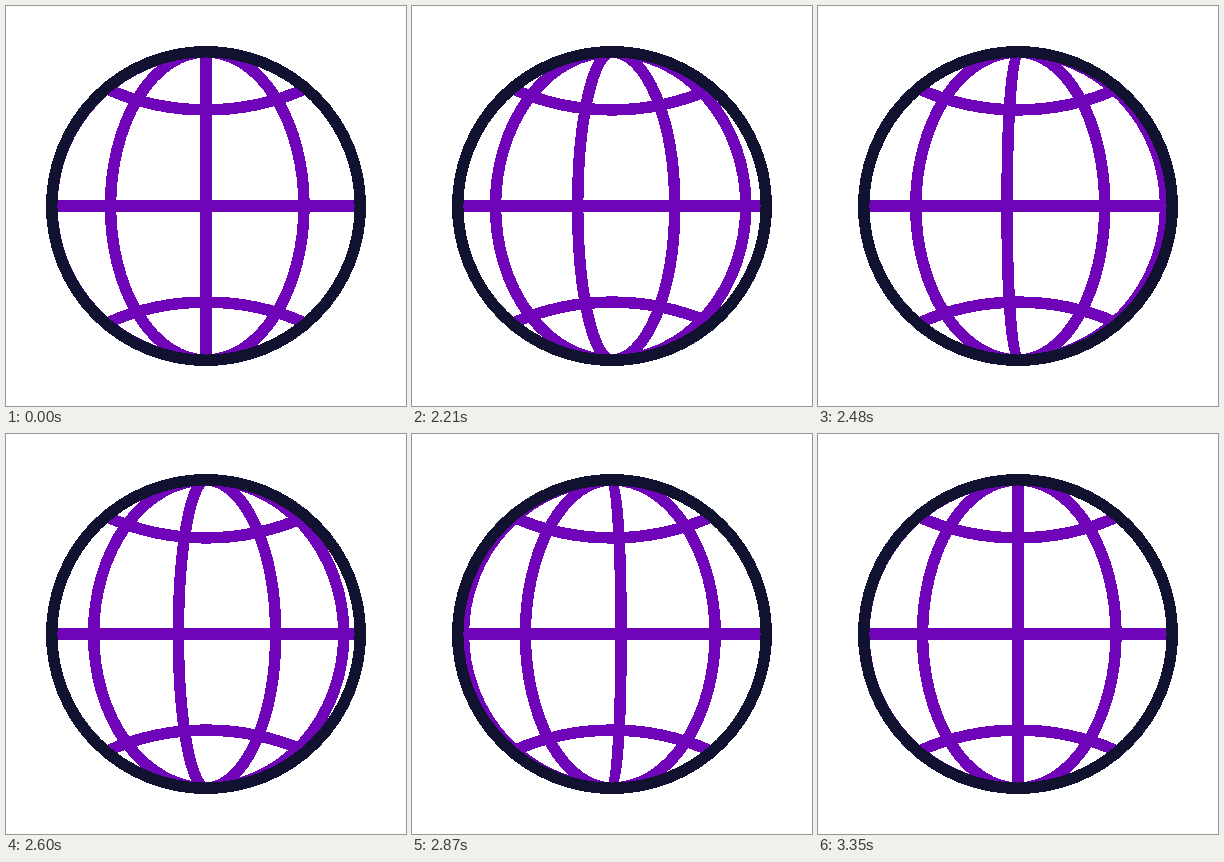
An HTML page for the animation above (3440 ms loop, 400 by 400 pixels).

```html
<!DOCTYPE html>
<html lang="en">
<head>
<meta charset="utf-8">
<title>Spinning globe</title>
<style>
  html, body { margin: 0; width: 100%; height: 100%; overflow: hidden; background: #fff; }
  svg { display: block; width: 100%; height: 100%; shape-rendering: crispEdges; }
  path, circle { fill: none; stroke: #7004b8; stroke-width: 11.5; }
  .rim { stroke: #11122f; }
</style>
</head>
<body>
<svg viewBox="0 0 400 400">
  <path d="M46 200H354"/>
  <path d="M101 83A245 245 0 0 0 299 83"/>
  <path d="M101 317A245 245 0 0 1 299 317"/>
  <g id="meridians"><path/><path/><path/><path/></g>
  <circle class="rim" cx="200" cy="200" r="154.3"/>
</svg>
<script>
  const LOOP = 3440, START = 2000, STEP = 30, STEPS = 45, TURNS = 7;
  const R = 154;
  // Each meridian slides from one stop to the next during a turn.
  const stops = [-R, -95.5, 0, 98, R];
  const lines = document.querySelectorAll('#meridians path');

  const bezier = (u, a, b) => 3 * (1 - u) * (1 - u) * u * a + 3 * (1 - u) * u * u * b + u * u * u;

  function ease(x) {
    if (x <= 0 || x >= 1) return x <= 0 ? 0 : 1;
    let lo = 0, hi = 1;
    for (let i = 0; i < 30; i++) {
      const mid = (lo + hi) / 2;
      if (bezier(mid, 0.167, 0.462) < x) lo = mid; else hi = mid;
    }
    return bezier(lo, 0.167, 1);
  }

  function meridian(x) {
    if (Math.abs(x) < 0.01) return `M200 ${200 - R}V${200 + R}`;
    return `M200 ${200 - R}A${Math.abs(x)} ${R} 0 0 ${x > 0 ? 1 : 0} 200 ${200 + R}`;
  }

  function draw() {
    const t = performance.now() % LOOP;
    const step = Math.min(STEPS, Math.max(0, Math.floor((t - START) / STEP)));
    const part = (ease(step / STEPS) * TURNS) % 1;
    lines.forEach((line, i) => {
      line.setAttribute('d', meridian(stops[i] + (stops[i + 1] - stops[i]) * part));
    });
    requestAnimationFrame(draw);
  }
  draw();
</script>
</body>
</html>
```
